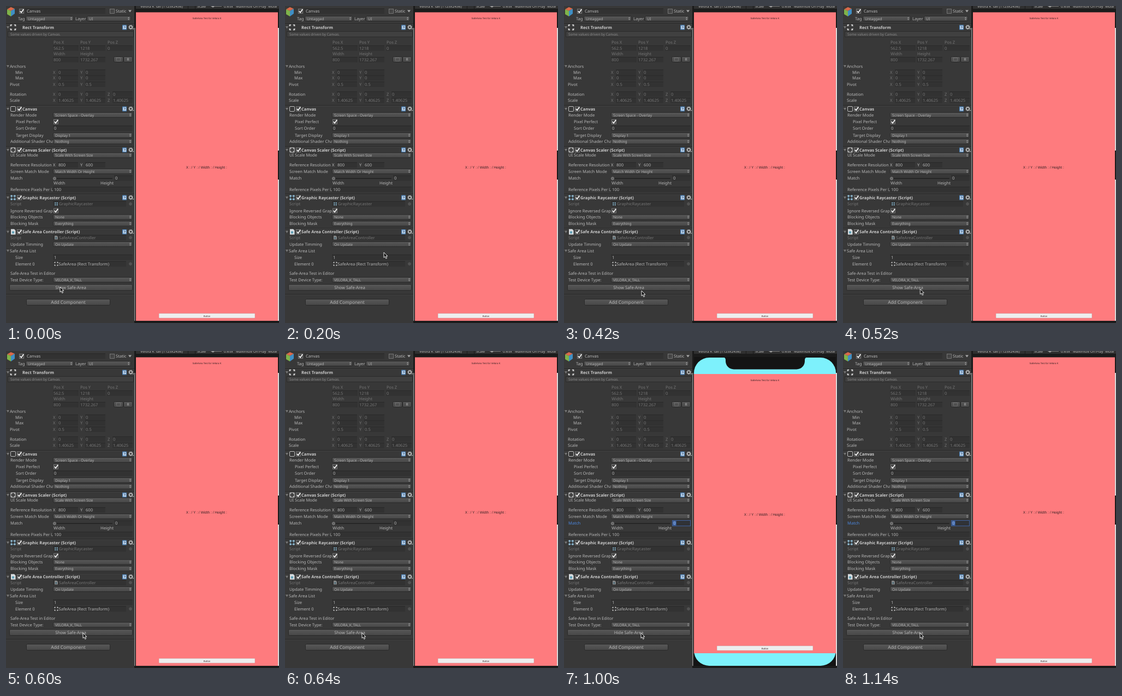
Recreate the animation shown at these times as an HTML page. Size 500x579 px, loop 1160 ms.

```html
<!DOCTYPE html>
<html lang="en">
<head>
<meta charset="utf-8">
<title>Safe area inspector</title>
<style>
  html, body { margin: 0; width: 100%; height: 100%; overflow: hidden; background: #383838; }
  svg { display: block; width: 500px; height: 579px; }
  text { font-family: "Noto Sans", "Open Sans", sans-serif; font-size: 7.6px; fill: #b8b8b8; text-rendering: geometricPrecision; white-space: pre; }
  .bold { font-weight: 700; fill: #cdcdcd; }
  .dim { fill: #757575; }
  .small { font-size: 6.7px; }
  .view { font-family: "Liberation Sans", Arial, sans-serif; fill: #3b2426; text-anchor: middle; }
  .mid { text-anchor: middle; }
</style>
</head>
<body>
<svg id="stage" viewBox="0 0 500 579" xmlns="http://www.w3.org/2000/svg"></svg>
<script>
const LOOP = 1160, SHOW = 660, HIDE = 1080;

const text = (s, x, y, cls = '', extra = '') =>
  `<text x="${x}" y="${y + 2.7}" class="${cls}" ${extra}>${s}</text>`;
const rect = (x, y, w, h, fill, extra = '') =>
  `<rect x="${x}" y="${y}" width="${w}" height="${h}" fill="${fill}" ${extra}/>`;
const path = (d, fill, extra = '') => `<path d="${d}" fill="${fill}" ${extra}/>`;
const line = (d, color, w = 1) => path(d, 'none', `stroke="${color}" stroke-width="${w}"`);

const label = (s, x, y, cls) => text(s, x, y, cls, 'clip-path="url(#labels)"');
const field = (x, y, w) => rect(x, y - 5, w, 10, '#323232') + rect(x, y - 5, w, 1, '#292929');
const box = (x, y, w, h) =>
  rect(x + .5, y + .5, w - 1, h - 1, 'url(#raised)', 'rx="2" stroke="#292929"');
const rule = y => rect(0, y, 235, 1, '#272727') + rect(0, y + 1, 235, 1, '#424242');
const fold = (x, y) => path(`M${x} ${y - 2}h5l-2.5 4.5z`, '#777');
const target = y =>
  `<circle cx="228" cy="${y}" r="2.2" fill="none" stroke="#777" stroke-width=".7"/><circle cx="228" cy="${y}" r=".8" fill="#777"/>`;

const menu = (s, y, x = 86, w = 146) =>
  box(x, y - 5, w, 10) + text(s, x + 4, y, 'small') +
  path(`M${x + w - 6} ${y - .7}l1.5-2 1.5 2zm0 1.4l1.5 2 1.5-2z`, '#aaa');

const check = (x, y, on = true) =>
  rect(x + .5, y - 4, 8, 8, '#444', 'stroke="#858585" stroke-width=".8"') +
  (on ? line(`M${x + 1.8} ${y - .3}l2.2 2.8 4.2-6`, '#fff', 1.6) : '');

// Four small arrows pointing outward
const arrows = (x, y, k = 1) =>
  `<g transform="translate(${x} ${y}) scale(${k})">` + [0, 90, 180, 270].map(a =>
    path('M-5-5h3.2l-3.2 3.2zM-4-4l2 2', '#d8d8d8', `transform="rotate(${a})" stroke="#d8d8d8" stroke-width=".7"`)).join('') + '</g>';

const docIcon = (x, y) =>
  path(`M${x} ${y - 5}h6l2.5 2.5v7.5h-8.5z`, '#d9dde0') + rect(x + 2, y - 1, 4, 4, '#5f9fb5');
const netIcon = (x, y, k = 1) =>
  `<g transform="translate(${x} ${y}) scale(${k})">` +
  line('M-3-5v10M3-5v10M-5-3h10M-5 3h10', '#69a8ca', .9) +
  [[-3, -3], [3, -3], [-3, 3], [3, 3]].map(([a, b]) => rect(a - 1.3, b - 1.3, 2.6, 2.6, '#9fc8dd')).join('') + '</g>';

const tools = y =>
  rect(213, y - 4.5, 8, 9, '#4f83b8', 'rx="1"') + rect(214.5, y - 3, 5.5, 6, '#c9d9e8') +
  line(`M216 ${y - 1.4}h2.4v1.6h-1.2v1.5`, '#345f8f', 1) +
  `<circle cx="228.5" cy="${y - .3}" r="2.6" fill="none" stroke="#b5b5b5" stroke-width="1.7"/>` +
  `<circle cx="228.5" cy="${y - .3}" r="3.8" fill="none" stroke="#b5b5b5" stroke-width="1" stroke-dasharray="1.5 1.5"/>` +
  path(`M231.5 ${y + 2}h3l-1.5 2z`, '#b5b5b5');
const header = (s, y, icon, toggle = true) =>
  rule(y - 7) + fold(1, y) + icon + (toggle ? check(20, y) : '') + text(s, 30, y, 'bold') + tools(y);

// Axis letters with their values, in the three inspector columns
const axes = (y, values, cls) => values.map((v, i) => {
  const x = [86, 136, 186][i];
  return field(x + 9, y, 37) + text('XYZ'[i], x, y, cls) + text(v, x + 10, y, cls);
}).join('');

const columns = (y, names, cls = 'dim') =>
  names.map((s, i) => text(s, [87, 136, 186][i], y, cls)).join('');

const objectBar = () =>
  path('M2 6l7-4 7 3-7 4z', '#d9694a') + path('M2 6l7 3v10l-7-4z', '#7fb34a') + path('M16 5v9l-7 5V9z', '#3f8fc4') +
  check(24, 9.5) + field(35, 9.5, 147) + text('Canvas', 38, 9.5) +
  check(190, 9.5, false) + text('Static', 201, 9.5) + path('M224 7.5h6l-3 4z', '#aaa') +
  text('Tag', 22, 23) + menu('Untagged', 23, 36, 88) +
  text('Layer', 127, 23) + menu('UI', 23, 148, 81);

const rectTransform = () =>
  header('Rect Transform', 39, arrows(13, 39), false) +
  rect(3.5, 46.5, 230, 10, '#404040', 'stroke="#2b2b2b"') +
  text('Some values driven by Canvas.', 8, 51.5, 'dim', 'style="font-size:6.4px;fill:#8d8d8d"') +
  columns(66, ['Pos X', 'Pos Y', 'Pos Z']) +
  [86, 135, 185].map(x => field(x, 77, 47)).join('') + columns(77, ['562.5', '1218', '0']) +
  columns(87.5, ['Width', 'Height']) +
  [86, 135].map(x => field(x, 98, 47)).join('') + columns(98, ['800', '1732.267']) +
  box(197, 92, 18, 11) + rect(202.5, 94.5, 7, 6, 'none', 'stroke="#888" stroke-dasharray="1.2 1.2"') +
  box(215, 92, 17, 11) + text('R', 223.5, 97.5, 'mid small') +
  fold(1, 110) + label('Anchors', 7, 110) +
  label('Min', 17, 121) + axes(121, [0, 0], 'dim') +
  label('Max', 17, 131.5) + axes(131.5, [0, 0], 'dim') +
  label('Pivot', 7, 143) + axes(143, ['0.5', '0.5'], 'dim') +
  label('Rotation', 7, 161) + axes(161, [0, 0, 0], 'dim') +
  label('Scale', 7, 172.5) + axes(172.5, Array(3).fill('1.40625'), 'dim');

const canvasPart = () =>
  header('Canvas', 188, rect(8.5, 183.5, 9, 9, 'none', 'rx="1.5" stroke="#bbb"')) +
  label('Render Mode', 8, 199) + menu('Screen Space - Overlay', 199) +
  label('Pixel Perfect', 18, 211.5) + check(87, 211.5) +
  label('Sort Order', 18, 223.5) + field(86, 223.5, 146) + text('0', 88, 223.5) +
  label('Target Display', 18, 236) + menu('Display 1', 236) +
  label('Additional Shader Channels', 8, 247.5) + menu('Nothing', 247.5);

const scaler = () =>
  header('Canvas Scaler (Script)', 263, rect(8.5, 258.5, 9, 9, 'none', 'rx="1.5" stroke="#aaa"') + arrows(13, 263, .65)) +
  label('UI Scale Mode', 8, 272.5) + menu('Scale With Screen Size', 272.5) +
  label('Reference Resolution', 8, 290.5) + axes(290.5, [800, 600]) +
  label('Screen Match Mode', 8, 302) + menu('Match Width Or Height', 302) +
  label('Match', 8, 314.5) + rect(88, 314, 107, 2, '#262626', 'rx="1"') +
  '<circle cx="89" cy="315" r="2.6" fill="#666" stroke="#999" stroke-width=".6"/>' +
  field(198, 314.5, 34) + text('0', 200, 314.5) +
  text('Width', 87, 323) + text('Height', 173, 323) +
  label('Reference Pixels Per Unit', 8, 335) + field(86, 335, 146) + text('100', 88, 335);

const raycaster = () =>
  header('Graphic Raycaster (Script)', 350, netIcon(13, 350)) +
  label('Script', 8, 361.5, 'dim') + field(86, 361.5, 134) + netIcon(92, 361.5, .6) + text('GraphicRaycaster', 97, 361.5, 'dim') + target(361.5) +
  label('Ignore Reversed Graphics', 8, 374) + check(87, 374) +
  label('Blocking Objects', 8, 385.5) + menu('None', 385.5) +
  label('Blocking Mask', 8, 397.5) + menu('Everything', 397.5);

const controller = () =>
  header('Safe Area Controller (Script)', 412.5, docIcon(9, 412.5)) +
  label('Script', 8, 423, 'dim') + field(86, 423, 134) +
  `<g opacity=".5" transform="translate(89 423) scale(.7)">${docIcon(0, 0)}</g>` +
  text('SafeAreaController', 97, 423, 'dim') + target(423) +
  label('Update Timming', 8, 435) + menu('On Update', 435) +
  fold(1, 447) + label('Safe Area List', 7, 447) +
  label('Size', 17, 459) + field(86, 459, 146) + text('1', 88, 459) +
  label('Element 0', 17, 471) + field(86, 471, 134) + arrows(92, 471, .65) + text('SafeArea (Rect Transform)', 96.5, 471) + target(471) +
  text('Safe-Area Test in Editor', 8, 488.5) +
  label('Test Device Type:', 8, 500) + menu('VELORA_K_TALL', 500) +
  box(6, 508, 226, 12) + rule(526) +
  box(37, 535, 154, 12) + text('Add Component', 114, 541, 'mid', 'style="font-size:8.3px"');

const toolbar = () =>
  rect(235, 0, 265, 579, '#1b1b1b') + rect(238, 0, 262, 5, '#303030') +
  [['Velora K Tall (1125x2436)', 246], ['Scale', 350], ['0.65x', 399], ['Maximize On Play', 421], ['Mute', 480]]
    .map(([s, x]) => text(s, x, 0, 'small')).join('') +
  rect(375, 0, 20, 1, '#777') + '<circle cx="379" cy="0" r="2.5" fill="#999"/>' +
  rect(333, 0, 1, 5, '#1b1b1b') + rect(346, 0, 1, 5, '#1b1b1b') +
  rect(235, 40, 1.5, 535, '#8b8b8b') +
  rect(498, 40, 2, 224, '#d5d5d5') + rect(498, 317, 2, 258, '#d5d5d5');

const game = (top, bottom) => {
  const mid = (top + bottom) / 2 + .8;
  return rect(238, top, 260, bottom - top, '#fe7b7e') +
    text('SafeArea Test for Velora K', 368, top + 10, 'view', 'style="font-size:4.5px"') +
    text('X : / Y : / Width : / Height :', 367.3, mid, 'view', 'style="font-size:6.55px"') +
    rect(280, bottom - 13.5, 176, 8.5, '#eeeeee', 'rx="1" stroke="#c98f92" stroke-width=".5"') +
    text('Button', 368, bottom - 9.8, 'view', 'style="font-size:4.3px"');
};

const action = s => text(s, 118.5, 514, 'mid', 'style="font-size:7.75px"');

const phone = () =>
  rect(238, 11, 260, 564, '#141414') + rect(238, 12, 260, 563, '#7df1fc', 'rx="28"') +
  path('M291 11.5q5 0 5 5v2a15 15 0 0 0 15 15h115a15 15 0 0 0 15-15v-2q0-5 5-5z', '#141414') +
  game(42, 552) + action('Hide Safe-Area');

const focus = () =>
  rect(7, 309, 30, 11, '#383838') + text('Match', 8, 314.5, '', 'style="fill:#4b87e0"') +
  rect(198.5, 309.5, 33, 10, '#303236', 'stroke="#3d5f9c"') +
  rect(199.5, 310.5, 6, 8, '#3e6fc0') + text('0', 200, 314.5);

document.getElementById('stage').innerHTML = `
  <defs>
    <linearGradient id="raised" x2="0" y2="1"><stop stop-color="#585858"/><stop offset="1" stop-color="#474747"/></linearGradient>
    <clipPath id="labels"><rect width="86" height="579"/></clipPath>
  </defs>` +
  rect(0, 0, 500, 579, '#383838') +
  objectBar() + rectTransform() + canvasPart() + scaler() + raycaster() + controller() + toolbar() +
  `<g id="plain">${game(11.5, 575) + action('Show Safe-Area')}</g>` +
  `<g id="phone">${phone()}</g><g id="focus">${focus()}</g>` +
  `<g id="cursor">${path('M0 0v9.5l2.2-2 1.7 3.8 1.7-.8-1.7-3.6h3z', '#111', 'stroke="#fff" stroke-width=".9"')}</g>`;

const play = (id, frames) =>
  document.getElementById(id).animate(
    frames.map(([t, style, easing = 'step-end']) => ({ offset: t / LOOP, easing, ...style })),
    { duration: LOOP, iterations: Infinity });

const on = { opacity: 1 }, off = { opacity: 0 };
play('plain', [[0, on], [SHOW, off], [HIDE, on], [LOOP, on]]);
play('phone', [[0, off], [SHOW, on], [HIDE, off], [LOOP, off]]);
play('focus', [[0, off], [SHOW, on], [LOOP, on]]);
play('cursor', [[0, 99, 513], [200, 181, 450], [420, 142, 520], [600, 141, 515], [LOOP, 141, 515]]
  .map(([t, x, y]) => [t, { transform: `translate(${x}px, ${y}px)` }, 'ease-in-out']));
</script>
</body>
</html>
```
